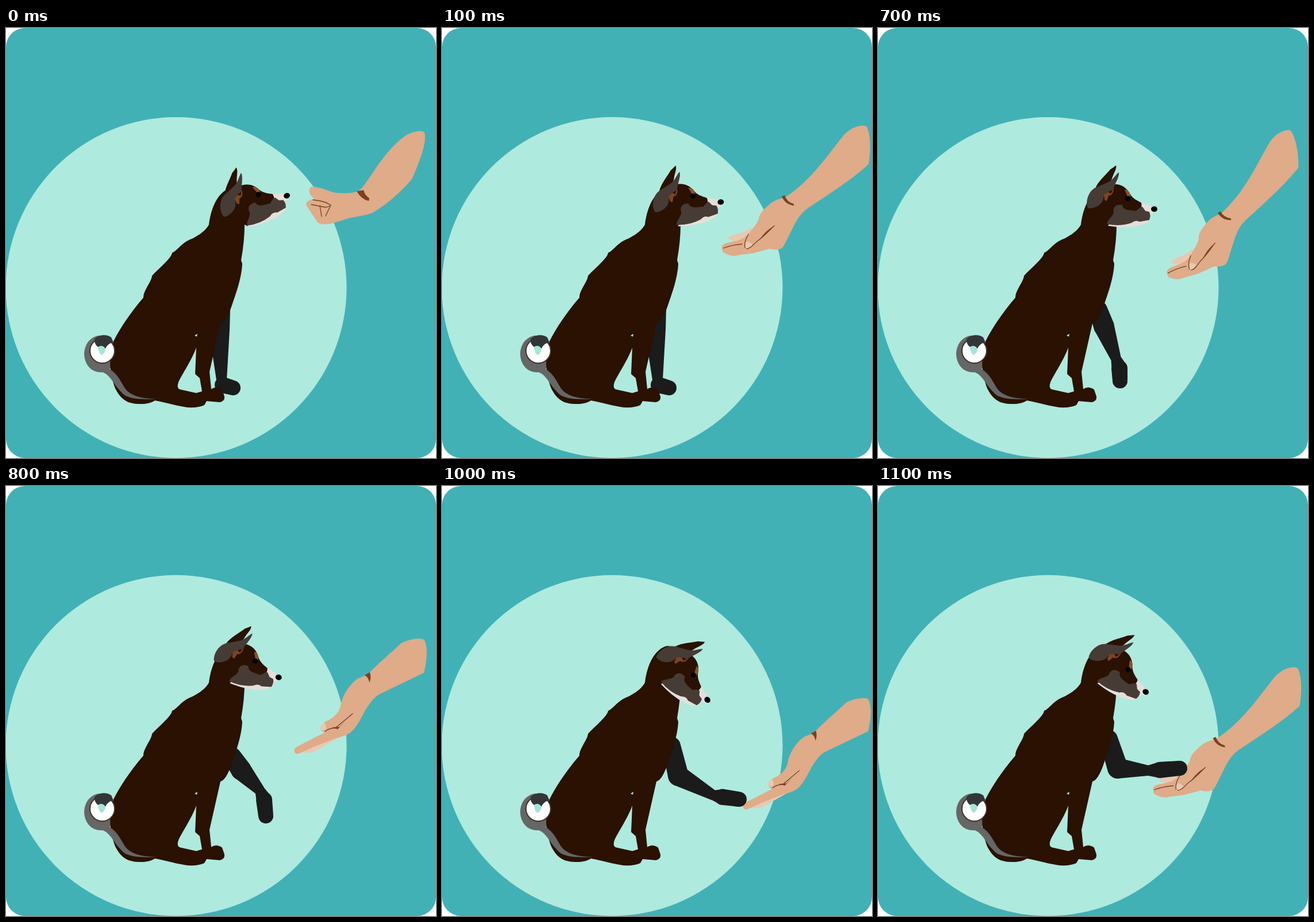
An HTML page for the animation above (1500 ms loop, 748 by 748 pixels).

```html
<!DOCTYPE html>
<html lang="en">
<head>
<meta charset="utf-8">
<title>Paw</title>
<style>
  html, body { margin: 0; width: 100%; height: 100%; overflow: hidden; background: #fff; }
  svg { display: block; width: 100vw; height: 100vh; }
  .word { font: 63px "Liberation Mono", "Courier New", monospace; letter-spacing: 6px; }
  .fur { fill: #2a1101; }
  .grey { fill: #473b36; }
  .skin { fill: #dfab88; }
  .pale { fill: #e8c8b1; }
  .band { fill: #7a4221; }
  .line { fill: none; stroke: #75401f; stroke-width: 1.3; stroke-linecap: round; }
</style>
</head>
<body>
<svg viewBox="0 0 748 748">
  <rect width="748" height="748" rx="33" fill="#41b1b6"/>
  <circle cx="296" cy="451.5" r="296.5" fill="#afeade"/>

  <g id="fist">
    <path class="skin" d="M695 187C705 181 723 176 728 182C733 200 717 238 706 263C690 282 665 305 640 320C628 327 603 328 590 333L570 339C562 342 548 343 542 338L522 308C521 302 528 299 536 297C526 290 525 278 532 276C545 276 560 283 570 286C590 289 607 287 613 283C622 280 640 245 665 215C675 204 685 194 695 187Z"/>
    <path class="band" d="M610 284Q618 298 631 301L632 296Q624 291 622 282Z"/>
    <path class="line" d="M531 307L556 312L565 309M534 299Q555 301 565 308M546 309L549 328M564 310L556 327"/>
  </g>

  <g id="open">
    <path class="pale" d="M498 367C496 358 522 360 537 348L550 352L535 374L508 371Z"/>
    <path class="skin" d="M700 185C712 172 733 166 739 172C746 186 746 215 742 237C715 262 675 288 637 313C622 323 615 338 609 350L595 378C591 386 583 387 570 384L548 390C535 394 522 393 512 396C502 397 496 394 489 390C485 380 487 375 500 373C515 370 523 368 531 360C540 350 546 343 551 333C551 325 558 317 565 311C573 303 582 297 595 296L602 291C645 262 675 215 700 185Z"/>
    <path class="pale" d="M529 372Q536 371 540 377Q536 384 530 384Q525 379 529 372Z"/>
    <path class="line" d="M489 383Q505 377 522 376M533 359Q525 372 527 382M530 384C538 384 544 373 552 368L578 344"/>
    <path class="band" d="M552 369Q562 353 578 344Q566 358 552 369Z"/>
    <path class="band" d="M591 293Q597 307 612 309V306Q600 303 596 291Z"/>
  </g>

  <g id="palm">
    <path class="pale" d="M512 462Q523 466 536 462L582 436L560 434Z"/>
    <path class="skin" d="M688 273C700 267 718 263 727 267C735 280 732 305 727 325L650 362C640 367 632 379 625 390C617 406 608 422 600 428C592 435 583 436 573 439L545 450C530 455 518 463 507 466C499 465 500 456 507 453L554 429L548 425C545 416 552 411 562 407C572 401 580 393 582 382C585 365 597 345 612 335L629 328C650 306 670 290 688 273Z"/>
    <path class="pale" d="M548 425Q546 415 553 411Q558 415 556 424Z"/>
    <path class="line" d="M555 427Q562 421 573 421L603 396"/>
    <path class="band" d="M566 420L580 419L590 409L577 423Z"/>
    <path class="band" d="M624 329Q631 333 632 342Q636 334 633 324Z"/>
  </g>

  <path id="leg" fill="#1b1b1b"/>
  <ellipse cx="164" cy="567" rx="28" ry="32" fill="#666"/>

  <g class="fur">
    <path fill-rule="evenodd" d="M353 342C345 357 325 366 318 369C306 374 297 388 289 391C288 400 268 416 254 431C253 442 239 456 239 469C215 497 198 523 187 545C178 575 180 600 190 627C202 650 215 655 240 654Q252 653 259 648C280 652 300 658 316 660Q335 661 345 656L349 649L372 651Q381 649 380 641L376 629Q366 622 357 628L354 598L373 514Q382 512 391 488C400 462 410 435 411 410L409 404Q415 370 415 342L408 284Q394 275 386 280C365 290 356 318 353 342ZM331 556C324 576 306 603 300 616Q296 628 304 629L331 635L341 632L337 609L329 602Z"/>
    <path fill="#afeade" d="M328 535l5-3-1 5Z"/>
  </g>

  <g id="tail">
    <path fill="#666" d="M158 598C180 596 184 618 203 636C212 645 235 647 262 645C235 645 217 640 207 627C198 612 194 602 180 593Z"/>
    <circle cx="167.500" cy="561.500" r="21.500" fill="#fff" stroke="#41332d" stroke-width="2"/>
    <path fill="#333637" d="M154 541C160 533 176 532 183 538L187 547Q177 548 173 558Q168 551 160 555Q153 549 154 541Z"/>
    <path fill="#a4e5d8" d="M160 555Q168 550 173 558Q173 565 166 569Q161 565 160 555Z"/>
  </g>

  <g id="head">
    <path class="fur" d="M414 239C416 245 409 254 407 262L401 275L378 279C384 265 397 255 404 246Q409 243 414 239Z"/>
    <path fill="#e4dfdb" d="M455 303L474 309L484 314L480 321L473 326L474 333C465 346 430 349 400 344L420 318Z"/>
    <path class="fur" d="M378 280L408 272C422 270 433 278 438 288C443 297 451 300 458 304Q461 317 447 320L412 326L398 342L378 318Z"/>
    <path class="grey" d="M398 341C399 333 408 329 410 321C408 310 416 306 425 308C426 317 437 317 449 318Q456 311 460 311L465 318L472 320Q475 326 472 334L455 337Q448 333 441 339Q420 346 398 341Z"/>
    <path class="grey" d="M419 251C420 260 412 270 409 282C400 284 393 288 392 297C390 308 374 316 365 313C360 303 366 282 380 277L401 268C409 264 414 254 419 251Z"/>
    <path fill="#7d451e" d="M393 290L400 285L405 288L410 279Q410 291 401 292L398 301L394 299Z"/>
    <path fill="#8d5228" d="M429 281Q438 281 439 293Q436 297 433 291Z"/>
    <circle cx="434.500" cy="296.500" r="4.500"/>
    <ellipse cx="480.500" cy="315" rx="5.500" ry="4.800"/>
  </g>

  <g id="bubble">
    <path fill="#fff" d="M664 118Q676 136 699 138Q685 142 666 143Z"/>
    <g transform="translate(551 106) rotate(-8)">
      <rect x="-114" y="-78.500" width="225" height="157.500" rx="29" fill="#fff"/>
      <rect x="-112" y="-77" width="222" height="150" rx="28" fill="#ebebeb"/>
      <rect x="-102" y="-78.500" width="213" height="142" rx="27" fill="#fff"/>
      <text class="word" x="-63" y="22" stroke="#fff" stroke-width="2.200">PAW</text>
      <path stroke="#000" stroke-width="2.800" d="M-65 20.500h21m21 0h16m14 0h16M-65 -18.500h12m39 0h14m22 0h16m12 0h16"/>
    </g>
  </g>
</svg>

<script>
const $ = id => document.getElementById(id);
const LOOP = 1500;

// Joints: shoulder, elbow, wrist, knuckle, toe
const RADII = [16, 18, 9, 14, 13];
const REST = [[374, 490], [371, 526], [375, 612], [377, 621], [395, 626]];
const HOME = [0, 0, 0, 1]; // x, y, turn, scale

const makePose = (turn, joints, hand, place = HOME) => ({ turn, joints, hand, place });

const sniff = makePose(-19.6, REST, "fist");
const ask = makePose(0, REST, "open");
const lift = makePose(0, [[383, 490], [393, 519], [414, 575], [420, 592], [421, 614]], "open", [0, 28, -9, 1]);
const bend = makePose(13, [[393, 470], [409, 494], [442, 530], [449, 546], [452, 574]], "palm");
const reach = makePose(38.7, [[399, 452], [411, 504], [472, 538], [488, 541], [517, 545]], "palm", [39.6, 113, 0, 0.965]);
const shake = makePose(30, [[401, 440], [417, 491], [470, 495], [490, 494], [525, 491]], "open", [-8.5, 145.5, 0, 1]);

const middle = (a, b) => Array.isArray(a) ? a.map((v, i) => middle(v, b[i])) : (a + b) / 2;
const between = (a, b) => makePose(
  middle(a.turn, b.turn), middle(a.joints, b.joints), b.hand, middle(a.place, b.place));

const STEPS = [
  [0, sniff], [100, between(sniff, ask)], [200, ask], [700, lift],
  [800, bend], [900, between(bend, reach)], [1000, reach], [1100, shake]
];

// A round joint at every point, joined by tapered bones
function limb(joints) {
  return joints.map(([x, y], i) => {
    const r = RADII[i];
    let d = `M${x - r} ${y}a${r} ${r} 0 1 0 ${2 * r} 0a${r} ${r} 0 1 0 ${-2 * r} 0Z`;
    if (i + 1 < joints.length) {
      const [u, v] = joints[i + 1], q = RADII[i + 1];
      const len = Math.hypot(u - x, v - y);
      const nx = (y - v) / len, ny = (u - x) / len;
      d += `M${x + nx * r} ${y + ny * r}L${u + nx * q} ${v + ny * q}`
         + `L${u - nx * q} ${v - ny * q}L${x - nx * r} ${y - ny * r}Z`;
    }
    return d;
  }).join("");
}

// The head sinks forward as it tips down
function headAt(turn) {
  const x = 447 + 0.2 * turn + 0.003 * turn * turn;
  const y = 277 + 0.72 * turn + 0.011 * turn * turn;
  return `translate(${x} ${y}) rotate(${turn}) translate(-447 -277)`;
}

const show = (id, on) => $(id).style.display = on ? "" : "none";
let current = null;

function draw(pose) {
  const [x, y, turn, scale] = pose.place;
  $("head").setAttribute("transform", headAt(pose.turn));
  $("leg").setAttribute("d", limb(pose.joints));
  ["fist", "open", "palm"].forEach(id => show(id, id === pose.hand));
  $(pose.hand).setAttribute("transform",
    `translate(${x} ${y}) rotate(${turn} 595 293) scale(${scale})`);
  show("bubble", pose === ask);
}

function tick() {
  const t = performance.now() % LOOP;
  const pose = STEPS.findLast(([start]) => start <= t)[1];
  if (pose !== current) draw(current = pose);
  requestAnimationFrame(tick);
}
tick();
</script>
</body>
</html>
```
